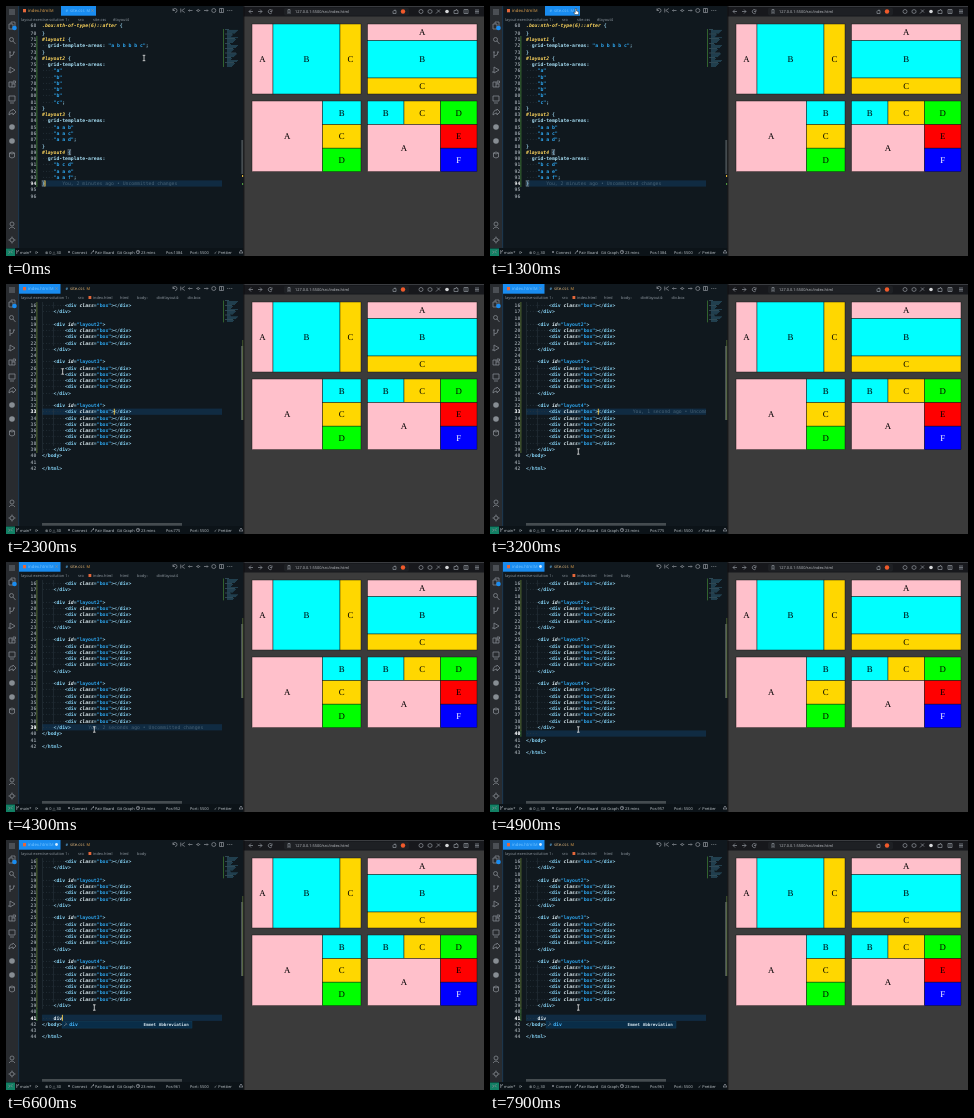
Recreate the animation shown at these times as an HTML page. Size 478x250 px, loop 8000 ms.

```html
<!DOCTYPE html>
<html lang="en">
<head>
<meta charset="utf-8">
<title>Grid layouts in a code editor</title>
<style>
html, body { margin: 0; width: 100%; height: 100%; overflow: hidden; background: #10181e; }
svg { display: block; width: 100vw; height: 100vh; }
text { white-space: pre; text-rendering: geometricPrecision; }
.ui { font: 3.9px "Noto Sans", sans-serif; fill: #8b949c; }
.tab { font-size: 4.3px; }
.code { font: bold 4.79px "DejaVu Sans Mono", monospace; fill: #a9dcf0; }
.num { fill: #8f989f; }
.now { fill: #f2f4f5; }
.dot { fill: #2b3740; }
.str { fill: #2ea8f2; }
.sel { fill: #ffd75e; font-style: italic; }
.attr { fill: #dcecf2; font-style: italic; }
.prop { fill: #a5dcf2; }
.tag { fill: #84d3f6; }
.mark { fill: #93c9e2; }
.blame { font-weight: normal; fill: #466073; }
.label { font: 8.8px "Liberation Serif", serif; text-anchor: middle; }
.icon { fill: none; stroke: #878d93; stroke-width: .75; }
</style>
</head>
<body>
<svg id="stage" viewBox="0 0 478 250"></svg>
<script>
const LOOP = 8000, CHAR = 2.885, LEFT = 36;
const SWITCH = 2200, CLICK = 3500, ENTER1 = 4400, ENTER2 = 5100;
const TYPED = [6100, 6300, 6400], POPUP = 6600;
const EDITOR = '#10181e', BLUE = '#198cf0';
const stage = document.getElementById('stage');
const cues = [];

function add(tag, attrs = {}, parent = stage, content = '') {
  const node = document.createElementNS('http://www.w3.org/2000/svg', tag);
  for (const key in attrs) node.setAttribute(key, attrs[key]);
  node.textContent = content;
  parent.append(node);
  return node;
}
const rect = (x, y, width, height, fill, parent, more) =>
  add('rect', { x, y, width, height, fill, ...more }, parent);
const dot = (cx, cy, r, fill, parent) => add('circle', { cx, cy, r, fill }, parent);
const icon = (x, y, d, parent) =>
  add('path', { d, class: 'icon', transform: `translate(${x} ${y})` }, parent);
const write = (x, y, str, cls = 'ui', parent = stage, fill = '') =>
  add('text', { x, y, class: cls, style: fill && `fill:${fill}` }, parent, str);
const column = n => LEFT + n * CHAR;

// Shows a node only within the given [from, to) spans.
function during(node, ...spans) {
  cues.push({ node, spans });
  return node;
}
const layer = (from, to = LOOP) => during(add('g'), [from, to]);

const SYNTAX = /(?<dot>·+)|(?<str>"[^"]*")|(?<sel>[#.][\w:()-]+)|(?<attr>\b(?:class|id)\b)|(?<prop>[a-z-]+(?=:))|(?<tag>[a-z]+)|(?<mark>\S)|\s+/g;

function code(y, src, parent) {
  const line = add('text', { x: LEFT, y: y + 1.7, class: 'code' }, parent);
  const dotted = src.replace(/^ +/, s => '·'.repeat(s.length));
  for (const m of dotted.matchAll(SYNTAX)) {
    const kind = Object.keys(m.groups).find(k => m.groups[k]) || '';
    add('tspan', { class: kind }, line, m[0]);
  }
}
const number = (y, n, parent, cls = 'num') => write(24.5, y + 1.7, n, 'code ' + cls, parent);
const band = (y, parent) => rect(LEFT, y - 3.1, 180, 6.2, '#102b42', parent);
const guide = (col, y, height, parent) => rect(column(col), y, .4, height, '#35424b', parent);
const caret = (col, y, ...spans) =>
  during(rect(column(col) - .3, y - 3, .9, 6, '#ffd24a'), ...spans);
const blame = (col, y, age, parent) =>
  write(column(col + 6), y + 1.7, `You, ${age} ago • Uncommitted changes`, 'code blame', parent)
    .setAttribute('clip-path', 'url(#pane)');

add('rect', { x: 0, y: 0, width: 216, height: 250 },
  add('clipPath', { id: 'pane' }, add('defs')));

function editorShell() {
  rect(0, 0, 238, 250, EDITOR);
  rect(0, 0, 12.5, 242, '#282b2f');
  rect(12.5, 0, .6, 242, '#1c4a70');
  const glyphs = {
    6: 'M-3-2H3M-3 0H3M-3 2H3',
    20: 'M-3-2H1V3H-3ZM-1-2V-4H3V1H1',
    35: 'M-.5-1.5m-2 0a2 2 0 1 0 4 0a2 2 0 1 0-4 0M1 0L3.5 3',
    49: 'M-2-3V3M2-3Q2 1-2 1M-3-3H-1M1-3H3',
    64: 'M-2-3L3 0L-2 3ZM-3 1V3',
    78: 'M-3-2H0V3H-3ZM0 0H3V3H0M1-3H3.5V-1H1Z',
    93: 'M-3-3H3V2H-3ZM-2 4H2',
    107: 'M-3 2Q-3-3 1-3V-4L4-1L1 2V0Q-1 0-3 2Z',
    149: 'M-2.5-2Q0-4 2.5-2V2Q0 4-2.5 2ZM-2.5-2Q0 0 2.5-2',
    220: 'M-2-2a2 2 0 1 0 4 0a2 2 0 1 0-4 0M-3 3Q0-1 3 3',
    234: 'M-2 0a2 2 0 1 0 4 0a2 2 0 1 0-4 0M0-3.5V-2M0 2V3.5M-3.5 0H-2M2 0H3.5'
  };
  for (const y in glyphs) icon(6, y, glyphs[y]);
  for (const y of [121, 135]) dot(6, y, 2.8, '#878d93');
  dot(8.5, 22, 2.3, BLUE);

  ['M-2 0a2 2 0 1 1 2 2M-2-2V0H0', 'M-2-2V2M2-2L-1 0L2 2', 'M-2 0H2M-1-1L-2 0L-1 1',
    'M-1 0a1 1 0 1 0 2 0a1 1 0 1 0-2 0M-2 0H-1M1 0H2', 'M-2 0H2M1-1L2 0L1 1',
    'M-2 0a2 2 0 1 0 4 0a2 2 0 1 0-4 0', 'M-2-2H2V2H-2ZM0-2V2', 'M-2 0H-1M0 0H1M2 0H3'
  ].forEach((d, i) => icon(169 + i * 7.75, 4.5, d));

  rect(0, 242, 238, 8, '#0c1318');
  rect(0, 242.5, 9, 7.5, '#128064');
  icon(4.5, 246.2, 'M-2-1L-.5 0L-2 1.5M2-2L.5-.5L2 1');
  icon(11.7, 246, 'M-1-2V2M1-2Q1 0-1 0');
  const status = [[14, 'main*'], [29, '⟳'], [39, '⊗ 0 △ 30'], [66, 'Connect'], [89, 'Pair Board'],
    [111, 'Git Graph'], [135, '23 mins'], [184, 'Port: 5500'], [208, '✓ Prettier']];
  for (const [x, str] of status) write(x, 247.6, str, 'ui', stage, '#b9c0c5');
  icon(63, 246, 'M-1-1L1 1M1-1L-1 1');
  icon(86, 246, 'M-1 2Q0-1 2-1M1-2L2-1L1 0');
  icon(132, 246, 'M-1.7 0a1.7 1.7 0 1 0 3.4 0a1.7 1.7 0 1 0-3.4 0M0-1V0H1');
  icon(235, 246, 'M-2 1H2L1 0V-1Q0-3-1-1V0Z');
}

function tabs(active, parent) {
  const first = active === 'index';
  rect(first ? 13 : 55, 0, first ? 41.5 : 35, 9.7, BLUE, parent);
  write(22, 6, 'index.html', 'ui tab', parent, first ? '#75c3ff' : '#e0a04c');
  write(64, 6, 'site.css', 'ui tab', parent, first ? '#e0b77c' : '#75c3ff');
  write(44, 6, 'M', 'ui', parent, first ? '#75c3ff' : '#e0a04c');
  write(80.5, 6, 'M', 'ui', parent, first ? '#e0a04c' : '#75c3ff');
  rect(17, 3, 3, 3.3, '#e5673a', parent);
  write(59.5, 6, '#', 'ui', parent, '#6ac3ff');
  icon(first ? 50.5 : 86.5, 4.5, 'M-1.2-1.2L1.2 1.2M1.2-1.2L-1.2 1.2', parent);
}

function crumb(x, str, parent) {
  write(x, 15, str, 'ui', parent);
  if (x > 15) write(x - 10, 15, '›', 'ui', parent);
}
const position = (n, from, to) =>
  write(160, 247.6, 'Pos:' + n, 'ui', layer(from, to), '#b9c0c5');

// Short dashes standing for the code overview.
function minimap(rows, top, parent) {
  rect(217, top, .7, rows * .95, '#438336', parent);
  for (let i = 0; i < rows; i++) {
    const indent = i % 5 ? 2 : 0;
    rect(219 + indent, top + i * .95, 4 + (i * 7) % 8, .5, i % 5 ? '#32677f' : '#4d7688', parent);
  }
}

function cssView() {
  const view = layer(0, SWITCH);
  const lineY = n => 27 + (n - 70) * 6.27;
  tabs('css', view);
  crumb(15, 'layout exercise-solution 1', view);
  crumb(72, 'src', view);
  crumb(87, 'site.css', view);
  crumb(107, '#layout4', view);
  band(lineY(94), view);
  for (const [col, n] of [[9, 89], [0, 94]])
    rect(column(col), lineY(n) - 2.8, CHAR, 5.6, '#263848', view, { stroke: '#81888b', 'stroke-width': .4 });
  rect(30.5, 30, .8, 151, '#438336', view);
  number(18.8, 68, view);
  code(18.8, '.box:nth-of-type(6)::after {', view);
  const areas = '  grid-template-areas:';
  const rule = (id, ...rows) => [`#layout${id} {`, areas, ...rows.map((r, i) =>
    `    "${r}"${i === rows.length - 1 ? ';' : ''}`), '}'];
  const lines = ['}', '#layout1 {', areas + ' "a b b b b c";', '}',
    ...rule(2, 'a', 'b', 'b', 'b', 'b', 'c'),
    ...rule(3, 'a a b', 'a a c', 'a a d'),
    ...rule(4, 'b c d', 'a a e', 'a a f'), '', ''];
  lines.forEach((src, i) => {
    number(lineY(70 + i), 70 + i, view, i === 24 ? 'now' : 'num');
    code(lineY(70 + i), src, view);
  });
  blame(1, lineY(94), '2 minutes', view);
  minimap(40, 23, view);
  rect(235.3, 134, 2.2, 34, '#454c50', view);
  rect(236, 169, 1.5, 2, '#e1b33b', view);
  rect(236, 177, 1.5, 2, '#4e963f', view);
  position(1384, 0, SWITCH);
  caret(1, lineY(94), [0, 200], [600, 1100], [1600, SWITCH]);
}

function htmlView() {
  const view = layer(SWITCH);
  const lineY = n => 21.3 + (n - 16) * 6.26;
  const box = '        <div class="box"></div>', close = '    </div>';
  const block = (id, count) => ['', `    <div id="layout${id}">`, ...Array(count).fill(box), close];
  const lines = [box, close, ...block(2, 3), ...block(3, 4), ...block(4, 6)];

  tabs('index', view);
  crumb(15, 'layout exercise-solution 1', view);
  crumb(72, 'src', view);
  rect(82.5, 12, 2.8, 3, '#e5673a', view);
  crumb(87, 'index.html', view);
  crumb(114, 'html', view);
  crumb(131, 'body', view);
  crumb(150.5, 'div#layout4', layer(SWITCH, ENTER1));
  crumb(181.5, 'div.box', layer(SWITCH, CLICK));
  minimap(23, 16.5, view);
  rect(235, 62, 2.7, 74, '#4a5254', view);
  rect(236.5, 56, 1, 80, '#637d36', view);
  rect(36, 239, 140, 2.7, '#454c50', view);
  rect(30.5, 18, .8, 151, '#637d36', view);
  rect(30.5, lineY(40) - 3, .8, 6.2, '#438336', layer(4600));
  rect(30.5, lineY(41) - 3, .8, 6.2, '#438336', layer(5300));

  const active = [[33, SWITCH, CLICK], [39, CLICK, ENTER1], [40, ENTER1, ENTER2], [41, ENTER2, LOOP]];
  for (const [n, from, to] of active) band(lineY(n), layer(from, to));
  for (let n = 16; n < 45; n++)
    number(lineY(n), n, layer(n === 44 ? ENTER2 : n === 43 ? ENTER1 : SWITCH));
  for (const [n, from, to] of active) number(lineY(n), n, layer(from, to), 'now');

  const codeLayer = layer(SWITCH);
  guide(0, 18, 151, codeLayer);
  lines.forEach((src, i) => {
    code(lineY(16 + i), src, codeLayer);
    if (src === box) guide(4, lineY(16 + i) - 3.13, 6.26, codeLayer);
  });
  [[SWITCH, ENTER1], [ENTER1, ENTER2], [ENTER2, LOOP]].forEach(([from, to], shift) => {
    const tail = layer(from, to);
    code(lineY(40 + shift), '</body>', tail);
    code(lineY(42 + shift), '</html>', tail);
  });
  blame(31, lineY(33), '1 second', layer(3200, CLICK));
  blame(10, lineY(39), '2 seconds', layer(4000, ENTER1));

  code(lineY(40), '    ', layer(ENTER1, ENTER2));
  code(lineY(41), '    ', layer(ENTER2));
  TYPED.forEach((from, i) => {
    const to = TYPED[i + 1] || LOOP;
    write(column(4), lineY(41) + 1.7, 'div'.slice(0, i + 1), 'code', layer(from, to), '#e1edf2');
    position(959 + i, from, to);
  });
  position(775, SWITCH, CLICK);
  position(952, CLICK, ENTER1);
  position(957, ENTER1, ENTER2);
  position(958, ENTER2, TYPED[0]);

  const unsaved = layer(ENTER1);
  rect(48, 2, 5, 5, BLUE, unsaved);
  dot(50.5, 4.5, 1.4, '#d5ecff', unsaved);

  caret(25, lineY(33), [SWITCH, CLICK]);
  caret(10, lineY(39), [CLICK, 4300]);
  caret(4, lineY(40), [ENTER1, 4900]);
  caret(4, lineY(41), [ENTER2, 5700]);
  caret(5, lineY(41), [TYPED[0], TYPED[1]]);
  caret(6, lineY(41), [TYPED[1], TYPED[2]]);
  caret(7, lineY(41), [TYPED[2], 6900], [7400, 7900]);

  const popup = layer(POPUP);
  rect(56, 181.2, 130, 6.9, '#092d48', popup, { stroke: '#16415f', 'stroke-width': .4 });
  icon(59.5, 184.5, 'M-1.5 1.7L.5-.3M0-1.5L1.7 0', popup);
  write(63.2, 186.1, 'div', 'code', popup, '#45b8ff');
  add('text', { x: 137.5, y: 185.9, class: 'code', style: 'font-size:4.2px;fill:#d2e2eb' }, popup, 'Emmet Abbreviation');
}

function browser() {
  rect(237.5, 0, 240.5, 250, '#3b3b3b');
  rect(237.5, 0, 240.5, 10.5, '#17181c');
  rect(237.5, 0, 240.5, 1, '#3a3c40');
  rect(237.5, 0, .8, 250, '#08090a');
  rect(278, 1.8, 125, 7.6, '#1e2024', stage, { rx: 2 });
  const glyphs = {
    245: 'M2 0H-2L0-2M-2 0L0 2', 254: 'M-2 0H2L0-2M2 0L0 2', 264: 'M1.5-1.5A2 2 0 1 0 2 1M2-2V0H0',
    283: 'M-1-2H1V2L0 1L-1 2Z', 388: 'M-1 0V2H2V-1H0M-1 0L1-2',
    415: 'M-2 0a2 2 0 1 0 4 0a2 2 0 1 0-4 0', 424: 'M-2-1L0-2L2-1V1L0 2L-2 1Z', 432: 'M-2 2L2-2M-1-2L2 1',
    450: 'M-2-1H0V-2H1V-1H2V2H-2Z', 460: 'M-2-2H2V2H-2ZM0-2V2', 471: 'M-2-1.5H2M-2 0H2M-2 1.5H2'
  };
  for (const x in glyphs) icon(x, 5.5, glyphs[x]);
  dot(441, 5.5, 1.8, '#d6d8da');
  dot(397, 5.5, 2.2, '#f05a2b');
  write(289, 7, '127.0.0.1:5500/src/index.html', 'ui', stage, '#b7babf');

  const colors = { A: 'pink', B: 'cyan', C: 'gold', D: 'lime', E: 'red', F: 'blue' };
  const cell = (name, x, y, x2, y2) => {
    rect(x, y, x2 - x, y2 - y, colors[name], stage, { stroke: '#111', 'stroke-width': .45 });
    write((x + x2) / 2, (y + y2) / 2 + 3, name, 'label', stage, name === 'F' ? 'white' : 'black');
  };
  cell('A', 246, 18, 267, 88);
  cell('B', 267, 18, 334, 88);
  cell('C', 334, 18, 355, 88);
  cell('A', 361.5, 18, 471, 34.6);
  cell('B', 361.5, 34.6, 471, 72);
  cell('C', 361.5, 72, 471, 88);
  cell('A', 246, 95, 316.5, 165.7);
  ['B', 'C', 'D'].forEach((name, i) => {
    cell(name, 316.5, 95 + i * 23.57, 355, 118.57 + i * 23.57);
    cell(name, 361.5 + i * 36.5, 95, 398 + i * 36.5, 118.57);
  });
  cell('A', 361.5, 118.57, 434.5, 165.7);
  cell('E', 434.5, 118.57, 471, 142.14);
  cell('F', 434.5, 142.14, 471, 165.7);
}

editorShell();
cssView();
htmlView();
browser();

const mouse = add('g');
const beam = add('path', { d: 'M-1.3-2.7H1.3M0-2.7V2.7M-1.3 2.7H1.3', stroke: '#f2f2f2', 'stroke-width': .75 }, mouse);
const hand = add('path', { d: 'M-.7-2.5H.5V0L2.6.7V3.5H-1.2L-2.3 1L-.7 1.5Z', fill: '#fff', stroke: '#111', 'stroke-width': .4 }, mouse);
during(beam, [0, 1000], [2300, LOOP]);
during(hand, [1000, 2300]);

const route = [[0, 138, 52], [600, 138, 52], [900, 101, 15], [1100, 86, 5], [1300, 86, 5],
  [1900, 24, 5], [2200, 24, 5], [2400, 88.3, 167.5], [LOOP, 88.3, 167.5]];

function mouseAt(t) {
  const i = route.findIndex(p => p[0] > t);
  const [t0, x0, y0] = route[i - 1], [t1, x1, y1] = route[i];
  const u = (t - t0) / (t1 - t0), e = u * u * (3 - 2 * u);
  return [x0 + (x1 - x0) * e, y0 + (y1 - y0) * e];
}

function frame() {
  const t = performance.now() % LOOP;
  for (const { node, spans } of cues)
    node.style.visibility = spans.some(([a, b]) => t >= a && t < b) ? 'visible' : 'hidden';
  mouse.setAttribute('transform', `translate(${mouseAt(t)})`);
  requestAnimationFrame(frame);
}
frame();
</script>
</body>
</html>
```
